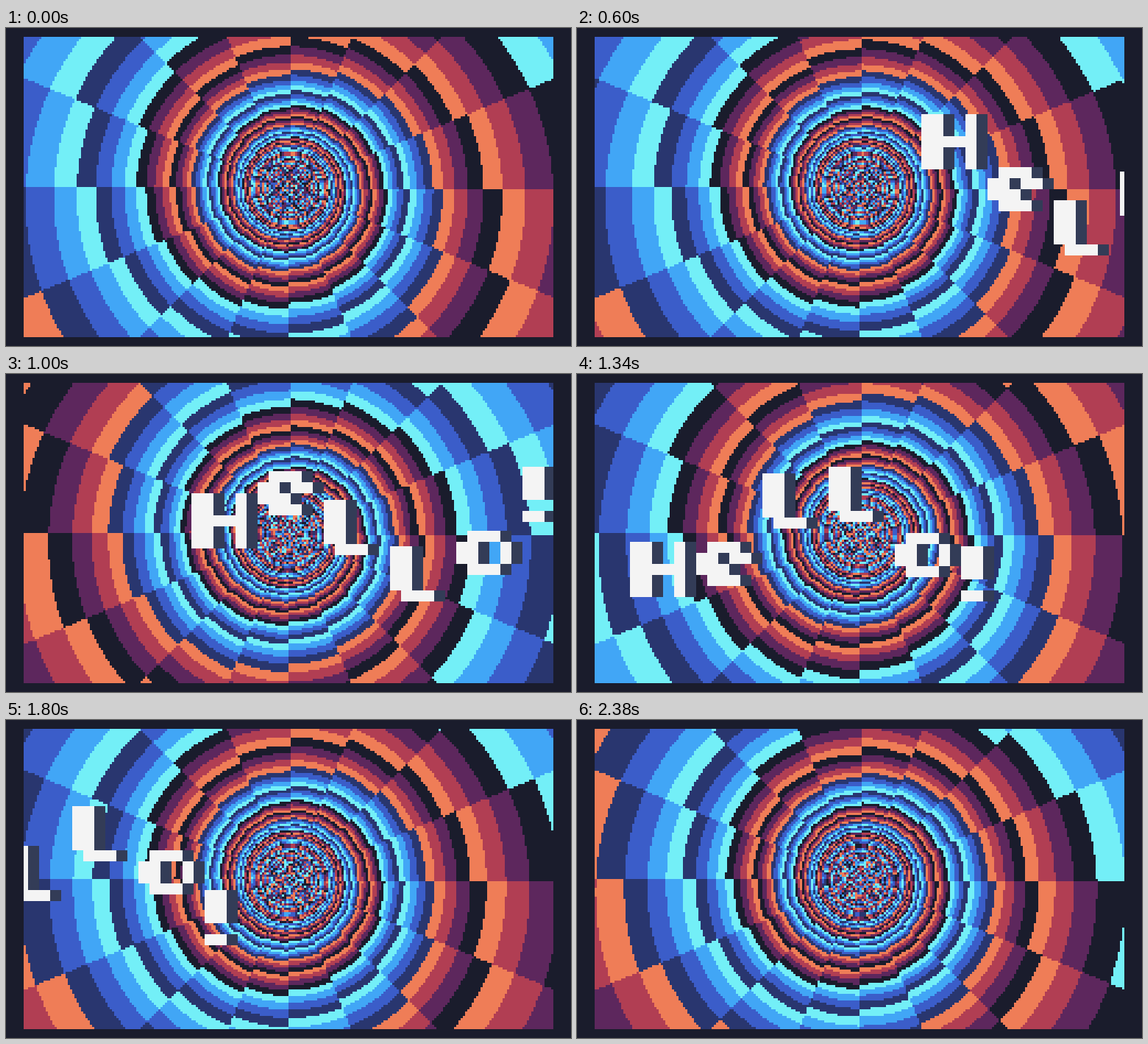
These frames come from a looping animation (768x432 px, 2400 ms). An HTML page with a canvas:

```html
<!DOCTYPE html>
<html lang="en">
<head>
<meta charset="utf-8">
<title>Hello tunnel</title>
<style>
  html, body { margin: 0; width: 100%; height: 100%; overflow: hidden; background: #1a1c2c; }
  canvas {
    position: absolute; left: 24px; top: 12px;
    width: 720px; height: 408px;
    image-rendering: pixelated;
  }
</style>
</head>
<body>
<canvas id="screen" width="240" height="136"></canvas>
<script>
const W = 240, H = 136, LOOP = 2400, STEP = 20;
const ctx = document.getElementById('screen').getContext('2d');
const image = ctx.createImageData(W, H);
const pixels = new Uint32Array(image.data.buffer);

const abgr = hex => {
  const v = parseInt(hex, 16);
  return (0xff000000 | (v & 255) << 16 | v & 0xff00 | v >> 16) >>> 0;
};
const warm = ['1a1c2c', '5d275d', 'b13e53', 'ef7d57'].map(abgr);
const cool = ['29366f', '3b5dc9', '41a6f6', '73eff7'].map(abgr);
const palette = [...warm, ...warm, ...cool, ...cool];

// Depth of each pixel plus its sector; lower rows are drawn slightly later.
const depth = new Float64Array(W * H);
for (let i = 0; i < depth.length; i++) {
  const x = i % W - 120, y = Math.floor(i / W) - 68;
  const sector = Math.floor(Math.atan2(x, y) * 8 / Math.PI);
  depth[i] = 1000 / (Math.hypot(x, y) + 0.1) - sector + y * 0.0032 - 3.36;
}

const glyphs = {
  H: ['##..#', '##..#', '#####', '##..#', '##..#'],
  e: ['', '.###', '##.##', '###', '.###'],
  l: ['##', '##', '##', '##', '.###'],
  o: ['', '.###', '##..#', '##..#', '.###'],
  '!': ['##', '##', '##', '', '##']
};
const CELL = 5;

function drawGlyph(char, x, y, color) {
  ctx.fillStyle = color;
  glyphs[char].forEach((row, j) => [...row].forEach((c, i) => {
    if (c === '#') ctx.fillRect(x + i * CELL, y + j * CELL, CELL, CELL);
  }));
}

function draw(time) {
  const tick = Math.floor(Math.floor(time / STEP) * 6 / 5);

  const shift = tick * 0.4368;
  for (let i = 0; i < depth.length; i++) {
    pixels[i] = palette[Math.floor(depth[i] + shift) & 15];
  }
  ctx.putImageData(image, 0, 0);

  [...'Hello!'].forEach((char, i) => {
    const x = 256 - 3 * tick + 30 * i;
    const y = Math.floor(55 + 20 * Math.sin(tick / 5 - 2.35 + 1.413 * i));
    drawGlyph(char, x + CELL, y, '#333c57');
    drawGlyph(char, x, y, '#f4f4f4');
  });
}

const start = performance.now();
function loop() {
  draw((performance.now() - start) % LOOP);
  requestAnimationFrame(loop);
}
loop();
</script>
</body>
</html>
```
